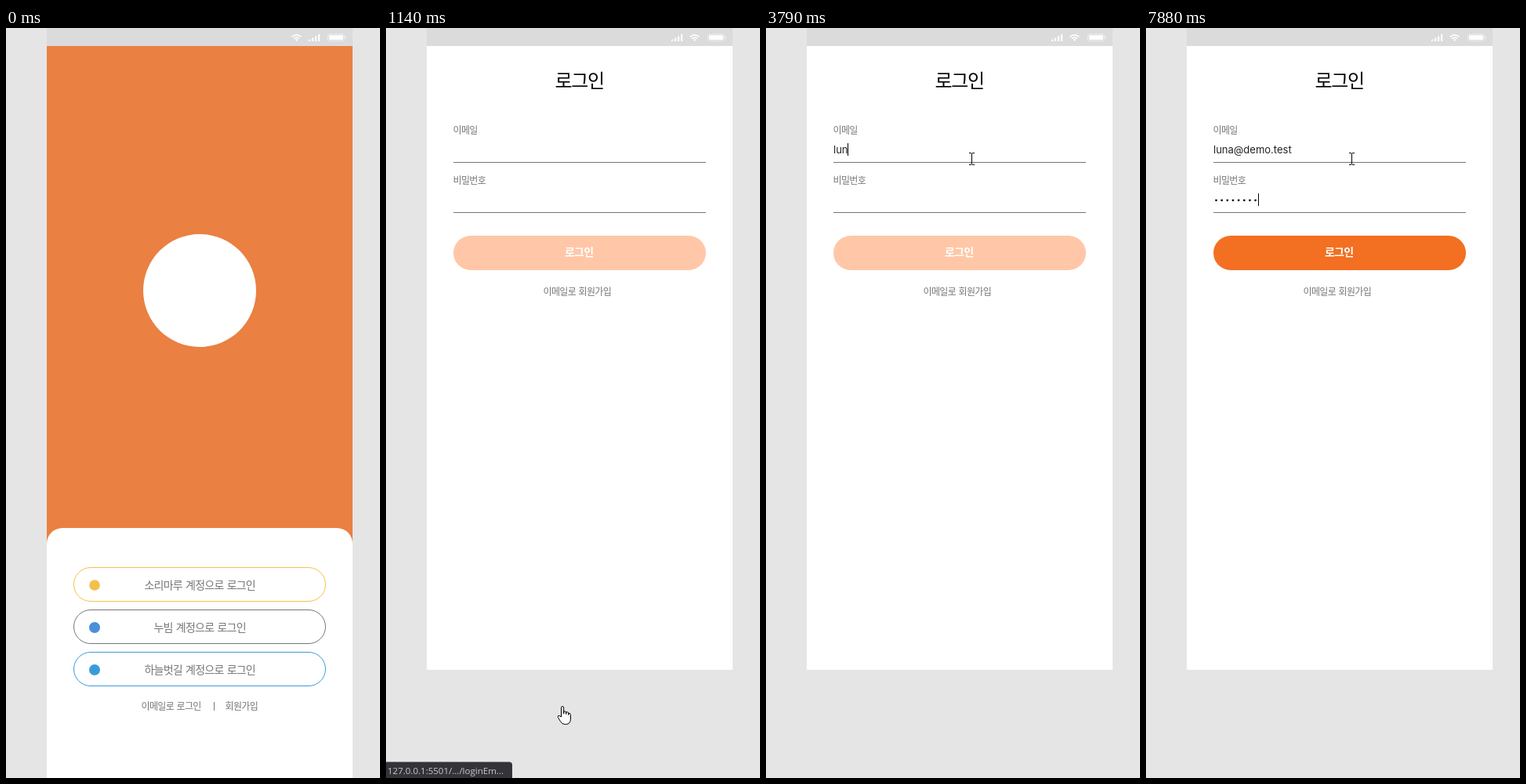
Write an HTML page that moves like this. It is 477 by 957 pixels and loops after 8000 ms.

```html
<!DOCTYPE html>
<html lang="ko">
<head>
<meta charset="utf-8">
<title>로그인</title>
<style>
  html, body { margin: 0; width: 100%; height: 100%; overflow: hidden; background: #e5e5e5; }
  svg { display: block; width: 100%; height: 100%; }
  text { font: 12px "Noto Sans CJK KR", "Noto Sans CJK JP", "Noto Sans CJK", sans-serif; fill: #767676; letter-spacing: -.055em; word-spacing: .07em; }
  .social text, #submit text { font-size: 14px; }
  .social rect { fill: none; }
  #submit text { fill: #fff; font-weight: 700; }
  #title { font-size: 24px; fill: #000; }
  #email { font: 13px Inter, Roboto, sans-serif; fill: #222; letter-spacing: 0; }
  #status text { font: 11.5px "Open Sans", "Noto Sans", sans-serif; fill: #c9c9cb; letter-spacing: 0; word-spacing: 0; }
</style>
</head>
<body>
<svg viewBox="0 0 477 957" preserveAspectRatio="none">
  <rect width="477" height="957" fill="#e5e5e5"/>

  <g id="splash">
    <rect x="52" y="23" width="390" height="934" fill="#ea8042"/>
    <circle cx="247" cy="335" r="72" fill="#fff"/>
    <path d="M52 957V658a20 20 0 0 1 20-20H422a20 20 0 0 1 20 20V957z" fill="#fff"/>
    <g class="social">
      <rect x="86.5" y="688.5" width="321" height="43" rx="21.5" stroke="#f2c14c"/>
      <circle cx="113" cy="711" r="6.8" fill="#f2c14c"/>
      <text x="176.5" y="716">소리마루 계정으로 로그인</text>
      <rect x="86.5" y="742.5" width="321" height="43" rx="21.5" stroke="#767676"/>
      <circle cx="113" cy="765" r="7" fill="#4a90d9"/>
      <text x="188.5" y="770">누빔 계정으로 로그인</text>
      <rect x="86.5" y="796.5" width="321" height="43" rx="21.5" stroke="#3a9bdc"/>
      <circle cx="113" cy="819" r="7" fill="#3a9bdc"/>
      <text x="176.5" y="824">하늘벗길 계정으로 로그인</text>
    </g>
    <text x="172.5" y="870">이메일로 로그인</text>
    <rect x="265" y="860" width="1" height="11" fill="#767676"/>
    <text x="279.5" y="870">회원가입</text>
  </g>

  <g id="login">
    <rect x="52" y="23" width="390" height="796" fill="#fff"/>
    <text id="title" x="215.5" y="76">로그인</text>
    <text x="85.5" y="135">이메일</text>
    <text id="email" x="86" y="160"></text>
    <text x="85.5" y="199">비밀번호</text>
    <g id="dots" fill="#111"></g>
    <path d="M86 171.5H408M86 235.5H408" stroke="#767676"/>
    <rect id="caret" width="1" height="16" fill="#000"/>
    <g id="submit">
      <rect id="pill" x="86" y="265" width="322" height="44" rx="22"/>
      <text x="228" y="291">로그인</text>
    </g>
    <text x="200.5" y="341">이메일로 회원가입</text>
  </g>

  <rect x="52" width="390" height="23" fill="#dbdbdb"/>
  <g id="wifi" fill="none" stroke="#fff" stroke-width="1.6">
    <path d="M.6 11.4Q6.5 6.2 12.4 11.4M3 13.7Q6.5 10.6 10 13.7"/>
    <path d="M4.6 14.7Q6.5 13.2 8.4 14.7L6.5 17z" fill="#fff" stroke="none"/>
  </g>
  <path id="bars" d="M0 17v-2.5h2.2V17zM4 17v-4.5h2.2V17zM8 17v-6.5h2.2V17zM12 17V8h2.2v9z" fill="#fff"/>
  <rect x="410.5" y="8" width="21" height="8.4" rx="2" fill="none" stroke="#fff" stroke-opacity=".5"/>
  <rect x="412" y="9.3" width="18" height="5.8" rx="1" fill="#fff"/>
  <rect x="432.6" y="10.7" width="1.2" height="3" rx=".6" fill="#fff" opacity=".6"/>

  <g id="status">
    <path d="M0 936.5H157a4 4 0 0 1 4 4V957H0z" fill="#343339"/>
    <text x="2" y="951.5">127.0.0.1:5501/.../loginEm...</text>
  </g>

  <g id="cursor">
    <path id="arrow" d="M.5 .5V16.5L4.2 13L6.6 18.5L9 17.5L6.6 12.1H11.8z" fill="#fff" stroke="#000"/>
    <path id="hand" transform="translate(-6 -1)" d="M5.5 14V2.2a1.6 1.6 0 0 1 3.2 0V10V7.3q1.6-1 3 .3V10.5V8.2q1.6-1 3 .4V11.5V9.6q2.8-.8 2.8 2V16q0 7.5-6.3 7.5h-1q-4 0-6-4.2l-3-5q-.2-2.2 1.8-1.8z" fill="#fff" stroke="#000" stroke-linejoin="round"/>
    <path id="beam" d="M-3-7.5H0M1-7.5H4M-3 7.5H0M1 7.5H4M.5-7V7" fill="none" stroke="#000"/>
  </g>
</svg>
<script>
const LOOP = 8000, SWAP = 1140, FOCUS = 2390, TAB = 6170, BLINK = 500;
const EMAIL = 'luna@demo.test';
const emailKeys = [3210, 3290, 3790, 3950, 4240, 4980, 5140, 5250, 5350, 5460, 5700, 5850, 5960, 6060];
const passKeys = [6900, 7020, 7150, 7270, 7480, 7690, 7780, 7880];
const presses = [FOCUS, ...emailKeys, TAB, ...passKeys];
const DOT = 7.15;

const $ = id => document.getElementById(id);
const show = (id, on) => $(id).style.display = on ? '' : 'none';
const move = (id, x, y) => $(id).setAttribute('transform', `translate(${x} ${y})`);
const count = (keys, t) => keys.filter(k => k <= t).length;
const span = (t, a, b) => Math.min(1, Math.max(0, (t - a) / (b - a)));
const mix = (a, b, k) => Math.round(a + (b - a) * k);
const easeOut = k => 1 - (1 - k) ** 3;
const easeInOut = k => k * k * (3 - 2 * k);
const within = (v, a, b) => v >= a && v <= b;

$('dots').innerHTML = passKeys.map((_, i) =>
  `<circle cx="${89.5 + i * DOT}" cy="219.8" r="1.4"/>`).join('');

function pointer(t) {
  if (t < SWAP) {
    const k = easeOut(span(t, 290, 1050));
    return [mix(438, 224, k), mix(940, 866, k)];
  }
  const k = easeInOut(span(t, 1340, 2180));
  return [mix(224, 262, k), mix(866, 170, k) - mix(0, 3, span(t, 2210, 2350))];
}

function shape(t, x, y) {
  if (t < SWAP) return within(x, 173, 249) && within(y, 857, 874) ? 'hand' : 'arrow';
  if (t < 1380 || within(y, 329, 344)) return 'hand';
  return within(y, 147, 172) || within(y, 211, 236) ? 'beam' : 'arrow';
}

function drawCursor(t) {
  const [x, y] = pointer(t), kind = shape(t, x, y);
  show('cursor', t >= 290);
  move('cursor', x, y);
  for (const id of ['arrow', 'hand', 'beam']) show(id, id === kind);
  show('status', t < SWAP ? kind === 'hand' : t < 1450);
}

function drawForm(t) {
  const typed = count(emailKeys, t), secret = count(passKeys, t);
  $('email').textContent = EMAIL.slice(0, typed);
  [...$('dots').children].forEach((dot, i) => dot.style.display = i < secret ? '' : 'none');
  $('pill').setAttribute('fill', secret ? '#f36f21' : '#ffc7a7');

  const last = presses[count(presses, t) - 1];
  const inPass = t >= TAB;
  const width = inPass ? secret * DOT : typed ? $('email').getComputedTextLength() : 0;
  $('caret').setAttribute('x', 86 + Math.floor(width));
  $('caret').setAttribute('y', inPass ? 211 : 147);
  show('caret', t >= FOCUS && (t - last) % (2 * BLINK) < BLINK);
}

function draw(t) {
  const login = t >= SWAP;
  show('splash', !login);
  show('login', login);
  move('wifi', login ? 387 : 364, 0);
  move('bars', login ? 364 : 386, 0);
  if (login) drawForm(t);
  drawCursor(t);
}

const start = performance.now();
function tick() {
  draw((performance.now() - start) % LOOP);
  requestAnimationFrame(tick);
}
tick();
</script>
</body>
</html>
```
